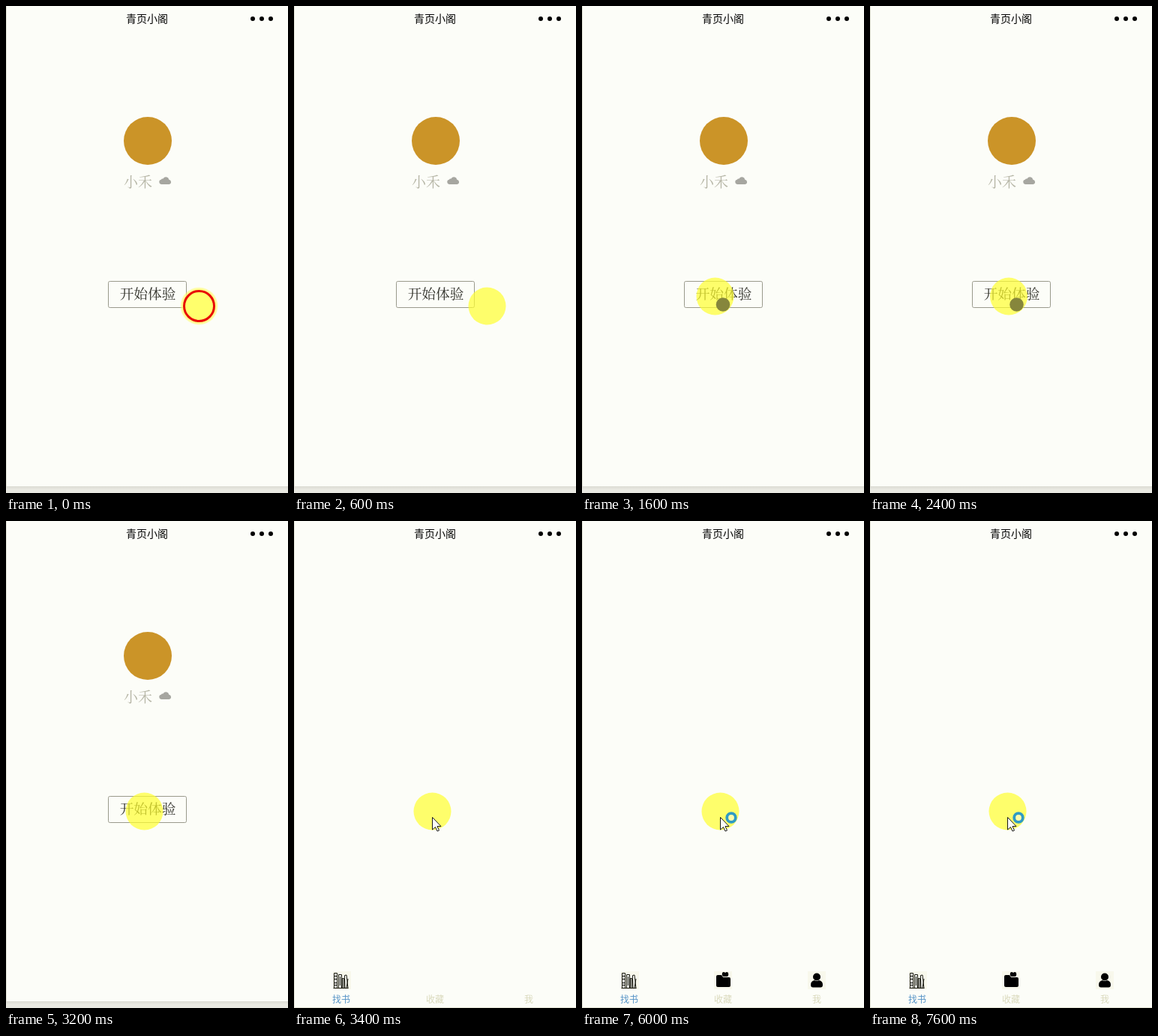
Recreate the animation shown at these times as an HTML page. Size 376 by 650 pixels, loop 8000 ms.

```html
<!DOCTYPE html>
<html lang="zh-CN">
<head>
<meta charset="utf-8">
<title>青页小阁</title>
<style>
html, body { margin: 0; width: 100%; height: 100%; overflow: hidden; background: #fcfdf8; }
svg { display: block; width: 376px; height: 650px; }
text { font-family: "Noto Sans CJK SC", "Noto Sans CJK", sans-serif; text-anchor: middle; }
.serif { font-family: "Noto Serif CJK SC", "Noto Sans CJK SC", "Noto Sans CJK", serif; font-weight: 300; }
.tab { font-size: 12px; fill: #d9d9bc; }
</style>
</head>
<body>
<svg viewBox="0 0 376 650">
  <defs>
    <radialGradient id="glow">
      <stop offset=".84" stop-color="#ffff6c"/>
      <stop offset="1" stop-color="#ffff6c" stop-opacity=".35"/>
    </radialGradient>
    <linearGradient id="shade" x2="0" y2="1">
      <stop stop-color="#dcdcd4"/>
      <stop offset=".5" stop-color="#e9e9e2"/>
    </linearGradient>
  </defs>
  <rect width="376" height="650" fill="#fcfdf8"/>
  <rect width="1" height="650" fill="#e2e2d6"/>

  <text x="188" y="22" font-size="14">青页小阁</text>
  <circle cx="329" cy="17" r="3"/>
  <circle cx="341" cy="17" r="3"/>
  <circle cx="353" cy="17" r="3"/>

  <g id="welcome">
    <circle cx="189" cy="180" r="32" fill="#cb9428"/>
    <text class="serif" x="176" y="242" font-size="19" fill="#b4b4a4">小禾</text>
    <path d="M207 238a3.200 3.200 0 0 1-.2-6.300q1-1.700 2.700-1.200a4.200 4.200 0 0 1 7.800 1.200a3.200 3.200 0 0 1 .2 6.300z" fill="#a6a6a0"/>
    <rect x="136.500" y="367.500" width="104" height="35" rx="2" fill="none" stroke="#9a9a8c"/>
    <text class="serif" x="189" y="391" font-size="18.700" fill="#2e2e28">开始体验</text>
    <rect y="641" width="376" height="9" fill="url(#shade)"/>
  </g>

  <g id="tabs">
    <rect y="649" width="376" height="1" fill="#e4e4d4"/>
    <g fill="#fcfdf8" stroke="#15150c">
      <rect x="52" y="601" width="24" height="24" fill="#f8f8ec" stroke="none"/>
      <path d="M53.500 603.500h4v20h-4zM53.500 607.500h4m-4 4h4m-4 5h4m-4 3h4"/>
      <path d="M59.500 605.500h4v18h-4zM61.500 608v12"/>
      <path d="M64.500 610.500h2v13h-2zM67.500 606.500l2.500-.5 2 17.500h-4zM72 611l-2 12"/>
      <path d="M52.500 623.500h20"/>
    </g>
    <text class="tab" x="63" y="643" style="fill:#5593c6">找书</text>
    <text class="tab" x="188" y="643">收藏</text>
    <text class="tab" x="313" y="643">我</text>
    <g id="late">
      <rect x="176" y="601" width="24" height="24" fill="#f8f8ec"/>
      <rect x="301" y="601" width="24" height="24" fill="#f8f8ec"/>
      <path d="M179 608q0-2 2-2h5l2 3h8q2 0 2 2v9q0 2-2 2h-15q-2 0-2-2z"/>
      <path d="M187 603q2-2 4 0q2-2 4 0q1 3-1 5h-6q-2-2-1-5z"/>
      <circle cx="313" cy="608.500" r="5"/>
      <path d="M305 619q0-5 5-6q3 2 6 0q5 1 5 6q0 3.500-3 3.500h-10q-3 0-3-3.500z"/>
    </g>
  </g>

  <g id="pointer">
    <g id="press">
      <circle r="25" fill="url(#glow)"/>
      <circle r="20" fill="#ffff6c" stroke="#e80808" stroke-width="3"/>
    </g>
    <circle id="halo" r="25" fill="#ffff30" fill-opacity=".7"/>
    <circle id="dot" cx="10.500" cy="11" r="9.300" fill="#86863c"/>
    <path id="arrow" d="M0 8v16.500l4-3.500 2.500 5.500 2.500-1-2.500-5.500h5z" fill="#fcfdf8" stroke="#1a1a1a"/>
    <circle id="busy" cx="14.500" cy="8.500" r="5.800" fill="#fffcac" stroke="#2f9bc4" stroke-width="3.800"/>
  </g>
</svg>
<script>
const LOOP = 8000, STEP = 200;
const $ = id => document.getElementById(id);
const show = (id, on) => $(id).setAttribute('visibility', on ? 'visible' : 'hidden');

// [time, x, y] of the pointer
const path = [
  [0, 257.5, 400.5], [600, 257.5, 400.5], [800, 137, 420], [1000, 148, 396.5],
  [1200, 162, 391], [1400, 177, 388], [1800, 178, 387], [2000, 186, 386.5],
  [2200, 187, 386.5], [2400, 185, 387.5], [2800, 184.5, 387.5],
  [6800, 184.5, 387.5], [7000, 183.5, 387.5], [LOOP, 183.5, 387.5]
];

function pointerAt(t) {
  const i = path.findIndex(p => p[0] > t);
  const a = path[i - 1], b = path[i];
  const k = (t - a[0]) / (b[0] - a[0]);
  return [a[1] + (b[1] - a[1]) * k, a[2] + (b[2] - a[2]) * k];
}

function draw(ms) {
  // the screen refreshes in fixed steps
  const t = Math.floor((ms % LOOP) / STEP) * STEP;
  const home = t >= 3400;
  show('welcome', !home);
  show('tabs', home);
  show('late', t >= 3600);
  show('press', t < 200);
  show('halo', t >= 200);
  show('dot', t >= 800 && t < 3200);
  show('arrow', home);
  show('busy', t >= 3600);
  $('pointer').setAttribute('transform', `translate(${pointerAt(t)})`);
}

const start = performance.now();
function tick() {
  draw(performance.now() - start);
  requestAnimationFrame(tick);
}
tick();
</script>
</body>
</html>
```
